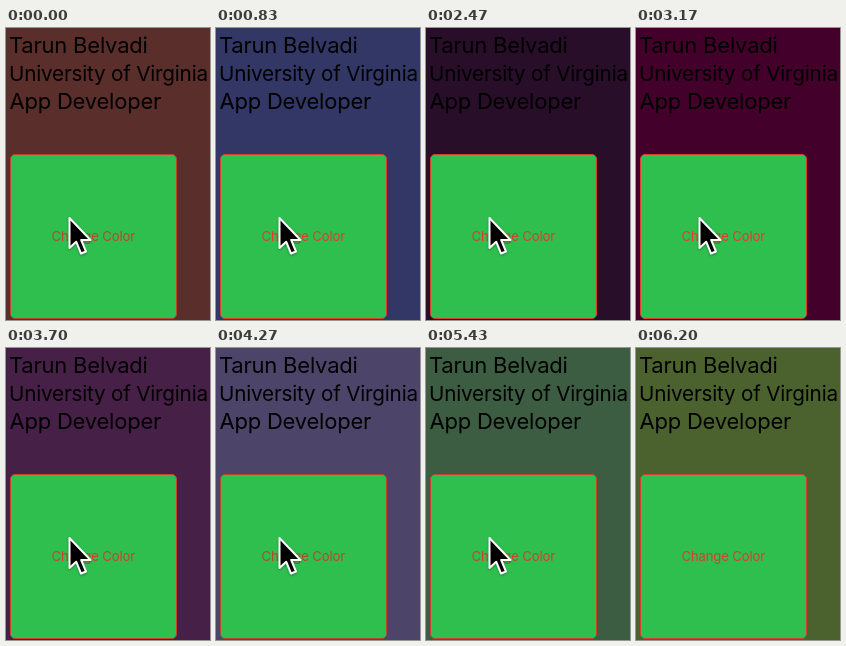
Animation, 204 px wide and 292 px high, one loop 6.23 s. Source, as an HTML page:

```html
<!DOCTYPE html>
<html lang="en">
<head>
<meta charset="utf-8">
<title>Change Color</title>
<style>
  html, body { margin: 0; width: 100%; height: 100%; overflow: hidden; }
  svg { display: block; width: 100vw; height: 100vh; }
  text { font-family: Inter, Roboto, sans-serif; letter-spacing: -.01em; }
  .title { font-size: 22px; }
  .wide { font-size: 20.7px; }
  .label { font-size: 13.1px; }
</style>
</head>
<body>
<svg viewBox="0 0 204 292">
  <rect id="backdrop" width="204" height="292"/>
  <text class="title" x="3" y="25">Tarun Belvadi</text>
  <text class="wide" x="3" y="53">University of Virginia</text>
  <text class="title" x="3.5" y="80.5">App Developer</text>
  <rect id="button" x="4.5" y="126.5" width="166" height="164" rx="4.5" fill="#2fbf4f"/>
  <text id="label" class="label" x="45.5" y="213">Change Color</text>
  <path id="pointer" d="M63.5 190V220L70.2 213.7L75 225.5L80 223.5L75.2 212H84.5Z"
    stroke="#fff" stroke-width="2" stroke-linejoin="round"
    style="filter:drop-shadow(0 1px 1px rgba(0,0,0,.3))"/>
</svg>
<script>
const LOOP = 6230;
const POINTER_GONE = 5930;
const DIM = [178, 72, 42], BRIGHT = [235, 58, 46];

// time in ms, backdrop colour, brightness of the red accent
const stops = [
  { at: 0, rgb: [89, 46, 43], glow: .1 },
  { at: 830, rgb: [50, 55, 101], glow: .8 },
  { at: 1800, rgb: [17, 27, 42], glow: .4 },
  { at: 3170, rgb: [66, 0, 43], glow: .8 },
  { at: 4270, rgb: [77, 68, 105], glow: .1 },
  { at: 5000, rgb: [32, 85, 99], glow: .1 },
  { at: 5730, rgb: [76, 98, 46], glow: .6 }
];

const byId = id => document.getElementById(id);
const backdrop = byId('backdrop'), button = byId('button');
const label = byId('label'), pointer = byId('pointer');
const mix = (a, b, p) => a + (b - a) * p;
const blend = (a, b, p) => `rgb(${a.map((c, i) => Math.round(mix(c, b[i], p)))})`;

function draw(t) {
  const next = stops.findIndex(s => s.at > t);
  const to = stops[next < 0 ? stops.length - 1 : next];
  const from = next < 0 ? to : stops[next - 1];
  const p = from === to ? 0 : (t - from.at) / (to.at - from.at);
  const eased = p * p * (3 - 2 * p);
  const accent = blend(DIM, BRIGHT, mix(from.glow, to.glow, eased));
  backdrop.setAttribute('fill', blend(from.rgb, to.rgb, eased));
  button.setAttribute('stroke', accent);
  label.setAttribute('fill', accent);
  pointer.setAttribute('visibility', t < POINTER_GONE ? 'visible' : 'hidden');
}

let start;
function tick(now) {
  start ??= now;
  draw((now - start) % LOOP);
  requestAnimationFrame(tick);
}
draw(0);
requestAnimationFrame(tick);
</script>
</body>
</html>
```
